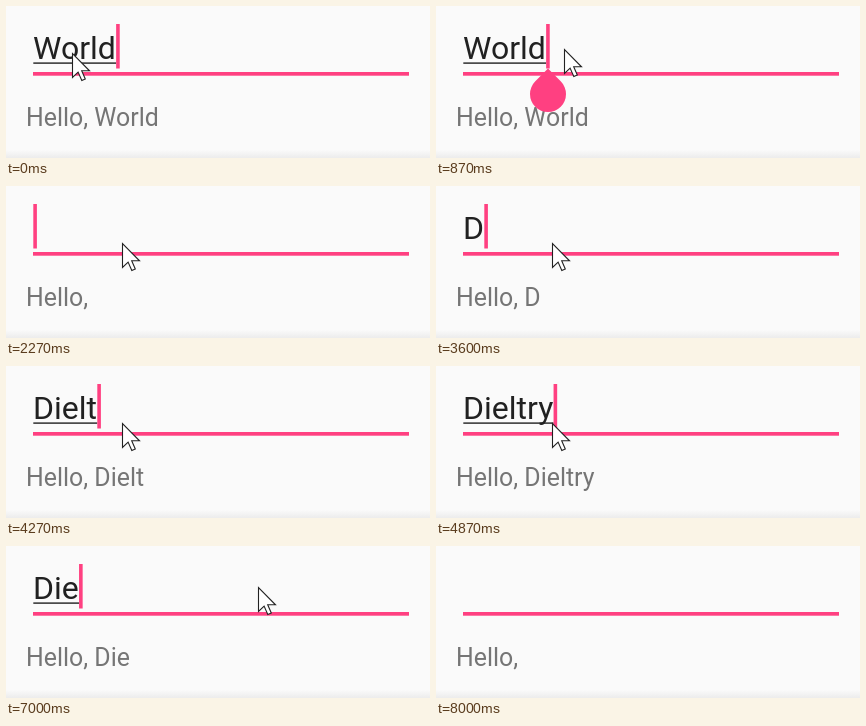
These frames come from a looping animation (424 px wide and 152 px high, 8190 ms). An HTML page:

```html
<!DOCTYPE html>
<html lang="en">
<head>
<meta charset="utf-8">
<title>Greeting field</title>
<style>
  html, body { margin: 0; width: 100%; height: 100%; overflow: hidden; background: #fafafa; }
  svg { display: block; width: 100%; height: 100%; }
  text { font-family: Roboto, sans-serif; white-space: pre; }
  #field { font-size: 32px; fill: #212121; }
  #label { font-size: 24.9px; fill: #757575; }
  .accent { fill: #ff4081; }
</style>
</head>
<body>
<svg viewBox="0 0 424 152">
  <defs>
    <linearGradient id="shade" x2="0" y2="1">
      <stop stop-color="#fafafa"/>
      <stop offset="1" stop-color="#ececec"/>
    </linearGradient>
  </defs>
  <rect width="424" height="152" fill="#fafafa"/>
  <rect y="144" width="424" height="8" fill="url(#shade)"/>
  <text id="label" x="20" y="120"></text>
  <rect class="accent" x="27" y="66" width="376" height="3.7"/>
  <text id="field" x="27" y="53"></text>
  <rect id="underline" x="27.3" y="56.4" height="1.4" fill="#212121"/>
  <rect id="caret" class="accent" y="18" width="3.6" height="44.5"/>
  <path id="handle" class="accent" d="M112 62.5 L124.7 75.3 A18 18 0 1 1 99.3 75.3 Z"/>
  <path id="pointer" d="M0 0V24L5.6 18.6L9.3 27L12.8 25.5L9.2 17.3H17Z"
        fill="#fff" stroke="#222" stroke-width="1.1"/>
</svg>
<script>
const LOOP = 8190;
const FPS = 15;
const TEXT_X = 27;
const BLINK = 7.5;
const NAME = 'Dieltry';

// All table times are in ticks of 1/15 s.
const deletions = (word, ticks) => ticks.map((tick, i) => [tick, word.slice(0, word.length - 1 - i)]);
const additions = (word, ticks) => ticks.map((tick, i) => [tick, word.slice(0, i + 1)]);

const edits = [
  [-2, 'World'],
  [12, 'World'], // tap: restarts the caret blink
  ...deletions('World', [24, 26, 29, 31, 34]),
  ...additions(NAME, [54, 58, 60, 62, 64, 68, 73]),
  ...deletions(NAME, [92, 96, 103, 105, 107, 109, 112]),
];

const pointerPath = [
  [0, 66.5, 47.5], [1, 70, 47.5], [4, 105, 46], [7, 128.5, 43.5],
  [13, 128.5, 43.5], [17, 116.5, 57.5],
  [87, 116.5, 57.5], [88, 180, 52], [89, 242, 45], [90, 242, 45], [91, 252.5, 41.5],
];
const POINTER_END = 109;
const HANDLE = { from: 12, to: 24 };
const PLAIN = { from: 54, to: 56 };

const within = (tick, span) => tick >= span.from && tick < span.to;
const $ = id => document.getElementById(id);
const [label, field, underline, caret, handle, pointer] =
  ['label', 'field', 'underline', 'caret', 'handle', 'pointer'].map($);

function show(node, visible) {
  node.setAttribute('visibility', visible ? 'visible' : 'hidden');
}

function pointAt(tick) {
  const next = pointerPath.findIndex(([time]) => time > tick);
  if (next < 0) return pointerPath[pointerPath.length - 1].slice(1);
  const [t0, x0, y0] = pointerPath[next - 1];
  const [t1, x1, y1] = pointerPath[next];
  const p = (tick - t0) / (t1 - t0);
  return [x0 + (x1 - x0) * p, y0 + (y1 - y0) * p];
}

function render(ms) {
  const tick = Math.floor(ms * FPS / 1000 + 0.01);
  const [editTick, word] = edits.filter(([time]) => time <= tick).pop();

  field.textContent = word;
  label.textContent = 'Hello, ' + word;
  const width = word ? field.getComputedTextLength() : 0;

  underline.setAttribute('width', width);
  show(underline, word && !within(tick, PLAIN));
  caret.setAttribute('x', TEXT_X + width + 0.3);
  show(caret, Math.floor((tick - editTick) / BLINK) % 2 === 0);
  show(handle, within(tick, HANDLE));
  pointer.setAttribute('transform', `translate(${pointAt(tick)})`);
  show(pointer, tick < POINTER_END);
}

const start = performance.now();
function loop() {
  render((performance.now() - start) % LOOP);
  requestAnimationFrame(loop);
}
loop();
</script>
</body>
</html>
```
